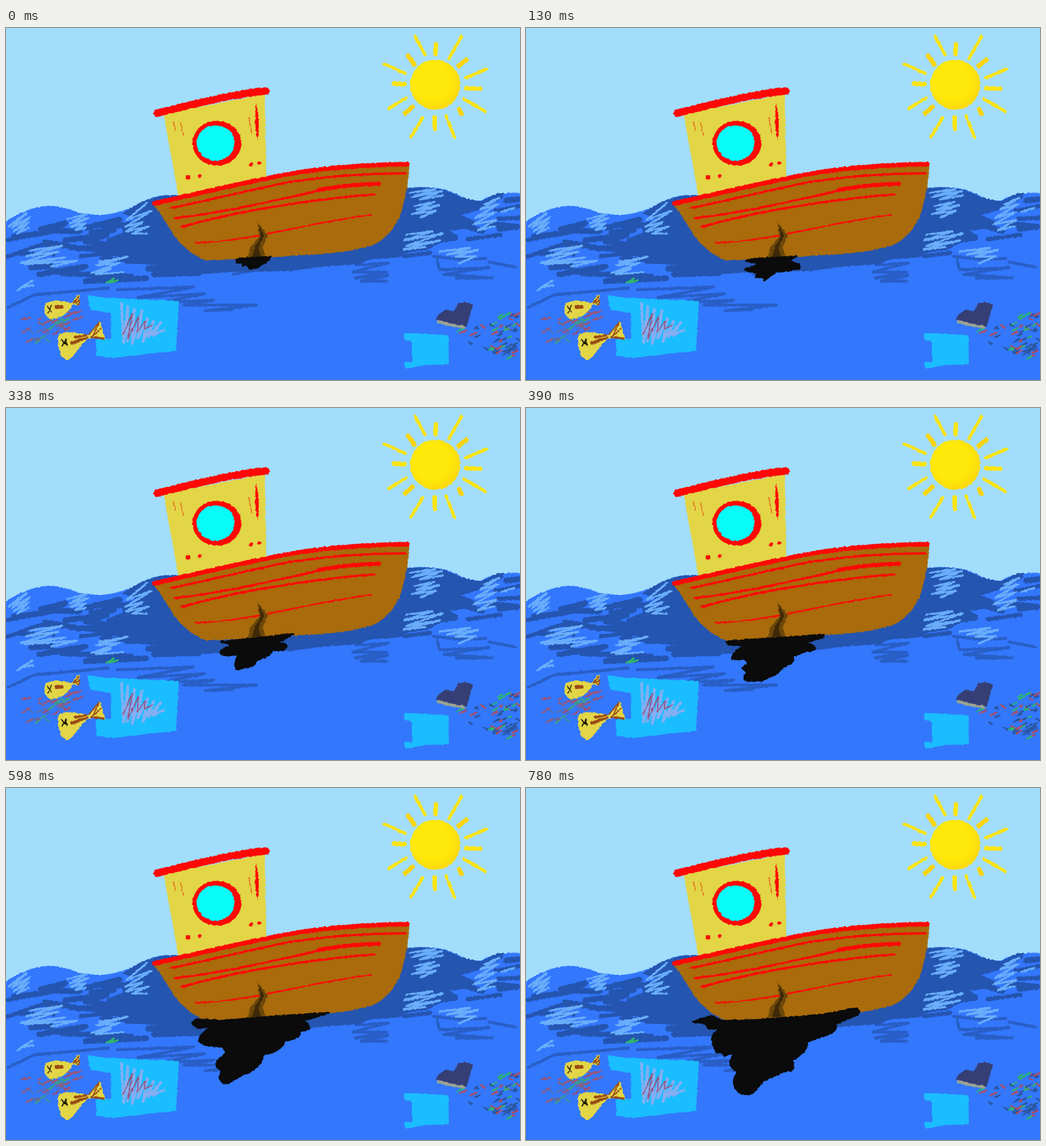
An HTML page for the animation above (0.91 s loop, 904 by 620 pixels).

```html
<!DOCTYPE html>
<html lang="en">
<head>
<meta charset="utf-8">
<title>Leaking boat</title>
<style>
  html, body { margin: 0; width: 100%; height: 100%; overflow: hidden; background: #a2ddfc; }
  svg { display: block; width: 904px; height: 620px; }
  .line { fill: none; stroke-linecap: round; stroke-linejoin: round; }
  .dark { stroke: #2455b0; }
  .light { stroke: #6aaefb; }
  .red { stroke: #fd0806; }
</style>
</head>
<body>
<svg viewBox="0 0 904 620">
  <defs>
    <filter id="crayon" filterUnits="userSpaceOnUse" x="0" y="0" width="904" height="620" color-interpolation-filters="sRGB">
      <feTurbulence type="fractalNoise" baseFrequency=".22" numOctaves="2" seed="4"/>
      <feDisplacementMap in="SourceGraphic" scale="4" xChannelSelector="R" yChannelSelector="G"/>
    </filter>
    <radialGradient id="sunFill" cx=".42" cy=".42" r=".62">
      <stop offset=".6" stop-color="#fee90a"/><stop offset="1" stop-color="#fbd70d"/>
    </radialGradient>
  </defs>

  <g filter="url(#crayon)">
    <g id="rays" class="line"></g>
    <circle cx="755" cy="100" r="44" fill="url(#sunFill)"/>

    <!-- sea -->
    <path fill="#3377fd" d="M-9 346C22 325 50 313 80 313C115 316 125 330 165 329C215 328 245 298 275 295L300 294 500 300 700 283C725 278 750 280 770 284C795 292 815 306 836 304C850 296 865 288 913 291V629H-9Z"/>
    <path fill="#2455b0" d="M204 327Q240 301 275 295L300 294 500 320 704 282Q750 279 774 286Q808 303 836 305L864 291 876 291 874 299 852 312 826 322 800 330 832 342 820 352 780 357 796 366 764 378 744 390 706 396 690 404 640 408 622 416 560 420 500 428 420 430 350 424 300 416 250 410 190 402 150 394 112 392 108 384 180 382 176 372 206 360 202 346 232 338Z"/>
    <g class="line dark" stroke-width="10">
      <path d="M62 354L104 344 72 357 130 358M104 374L178 364 140 376 200 384M142 352L200 337 172 351 222 345M150 360L190 356"/>
      <path d="M58 434L140 420 98 432 220 438 140 446 246 441M44 422L80 420M212 410L330 416 250 424 412 424 260 434 340 432"/>
      <path d="M846 345L900 350 868 354M806 348L838 358M880 304L904 301M744 376L790 370M14 368L74 360"/>
      <g stroke-width="7">
        <path d="M0 404L60 382 128 386 68 376M20 398L84 398M0 374L40 366M132 402L200 394 168 406 236 410"/>
        <path d="M860 322L904 314M866 336L904 334M812 372L870 364M700 402L746 396"/>
      </g>
      <g stroke-width="5" opacity=".72">
        <path d="M4 492L50 470 180 458M196 461L330 456 232 475 350 468 270 484 366 479 312 488 440 488 350 498 398 496"/>
        <path d="M616 418L672 414 610 430 670 430 614 440 672 436 624 446 670 446"/>
        <path d="M752 402Q800 410 844 406M762 425L758 408M764 426L850 422 770 434 856 440 792 441M850 412L896 421M390 428L460 421 400 434"/>
      </g>
    </g>
    <g class="line light" stroke-width="3.6">
      <path d="M4 350L36 326 10 352 42 333 14 358 40 342 20 362 40 352M108 336L142 328 112 344 146 334 114 350 140 344 122 356 140 352"/>
      <path d="M248 308L212 338 256 322 210 350 240 342 212 358 250 350 222 362 248 362M42 392L98 384 36 402 92 394 26 414 104 404 34 416 124 410 80 420"/>
      <path d="M164 412L214 403 158 418 200 414 150 432 184 424 158 434 206 430M20 462L46 445 26 457 48 453"/>
      <path d="M710 290L756 284 714 298 766 287 728 302 768 295M718 314L754 306 722 320 762 312 714 328 756 322 728 334"/>
      <path d="M704 364L750 358 700 374 768 362 704 384 764 374 700 390 738 386M762 394L816 387 776 399 830 391 790 403 826 402 796 415"/>
      <path d="M842 310L868 299 834 320 866 310 826 334 862 324 822 346 862 338 830 356 860 349M872 324L894 317"/>
    </g>

    <!-- boat -->
    <path fill="#e2d546" d="M277 152L455 116 458 266 304 298Z"/>
    <path class="line red" stroke-width="13" d="M266 150C330 134 400 116 457 111"/>
    <ellipse cx="371" cy="203" rx="43" ry="39.5" fill="#fd0806"/>
    <ellipse cx="368.700" cy="202.500" rx="33.500" ry="31" fill="#06fbf9"/>
    <path fill="#fd0806" d="M440 132Q448 170 442 197Q436 170 440 132Z"/>
    <path class="line" stroke="#e8641f" stroke-width="1.600" d="M294 165L298 179M307 166L312 188M427 158L432 185"/>
    <g fill="#fd0806"><circle cx="320" cy="263" r="4"/><circle cx="341" cy="260" r="3.500"/><circle cx="431" cy="240" r="3.500"/><circle cx="445.500" cy="237.500" r="3"/></g>
    <path fill="#a96b0b" d="M258 309C270 325 280 340 293 362C310 385 330 402 352 409C400 409 450 404 560 398C600 394 640 387 655 377C680 362 695 335 700 305C705 285 710 260 709 238C600 240 540 255 458 265L304 296Z"/>
    <g class="line red" stroke-width="4">
      <path stroke-width="8" d="M261 309C330 293 480 258 530 252C600 243 660 240 706 240"/>
      <path d="M290 317C350 305 420 287 500 271C580 259 650 256 702 256M297 335C400 322 450 308 510 296L560 284M310 350C380 330 500 305 648 293"/>
      <path stroke-width="7" d="M550 285Q600 276 656 274"/>
      <path stroke-width="2.600" d="M333 378C420 378 520 345 642 329"/>
    </g>
    <path fill="#6b4709" d="M442 341L461 366 451 385 457 404 425 404 430 386 446 367Z"/>
    <path fill="#3f2806" d="M444 347L454 366 444 386 448 403 433 403 438 385 448 368Z"/>

    <!-- litter -->
    <g id="flecks" class="line" stroke-width="3"></g>
    <path class="line" stroke="#2fb86d" stroke-width="3" d="M177 449L190 441 182 449 197 444"/>
    <path fill="#1abdff" d="M143 470L165 474 200 476 304 481 299 569 250 574 190 581 159 578 158 549 184 547 185 502 148 496ZM700 537L778 541 779 592 738 594 702 600 700 589 715 588 713 551 701 550Z"/>
    <path class="line" stroke="#83aff2" stroke-width="4.500" d="M203 484L207 554 214 490 214 552 226 496 222 556 239 499 232 546 249 512 241 552 260 516 250 544 272 519 258 542 277 532"/>
    <path class="line" stroke="#96517f" stroke-width="2" d="M206 540L222 503 214 548 233 508 231 535 245 516 243 530 258 523"/>
    <path fill="#363f75" d="M757 514Q758 502 774 497L788 499 795 485 808 483 821 487 810 527Z"/>
    <path class="line" stroke="#9ba393" stroke-width="5" d="M760 517L782 523 806 527"/>
    <g fill="#e2d546">
      <path d="M68 490C70 480 90 478 117 484L124 472 130 471 129 489 118 487C108 505 90 513 78 513C70 508 66 500 68 490Z"/>
      <path d="M92 542C95 535 115 533 145 541L165 516 175 548 148 546C125 560 122 580 108 585C95 583 90 560 92 542Z"/>
    </g>
    <g class="line" stroke="#9b4b16" stroke-width="2">
      <path d="M119 484L128 473 128 488 121 483 130 480M146 540L164 518 153 542 167 530 149 545 172 547"/>
      <path stroke-width="6" d="M88 492L99 491M116 555L127 551"/>
      <path stroke-width="4" d="M122 545L142 541M130 549L144 546M154 545L172 547"/>
    </g>
    <path class="line" stroke="#2b210b" stroke-width="1.800" d="M73 490L80 500M80 488L74 502"/>
    <path class="line" stroke="#1b1406" stroke-width="3" d="M98 550L107 558M106 549L99 560"/>
    <path id="oil" fill="#0b0b0b" stroke="#0b0b0b" stroke-width="3" stroke-linejoin="round"/>
  </g>
</svg>
<script>
const STEP = 130;
const oil = document.getElementById('oil');
const spills = [
  'M405 408L412 406 440 404 465 403Q464 410 450 417L440 423 429 424 424 418 416 419 418 414 405 413Z',
  'M398 407L425 405 476 402 461 411 480 416 482 423 452 429 440 429 419 445 416 439 404 439 407 431 390 429 385 425 411 416 387 410Z',
  'M378 412L440 405 505 398 488 408 473 414Q496 413 493 422Q486 430 470 426L462 436 442 444 434 454 406 461Q399 456 408 434Q382 440 377 430Q378 424 398 418Z',
  'M353 411L440 405 524 399 524 403 490 414Q508 416 508 425L485 431 470 438Q474 448 455 455L440 469 415 480 390 481Q378 476 390 466L380 458 391 450 384 442 363 443Q358 434 384 418L356 417Z',
  'M327 414L335 407 380 410 470 402 568 396 550 402 520 411Q534 412 533 424L517 429Q520 440 490 446Q485 464 451 470Q454 484 430 499L405 511Q391 522 384 520Q372 516 379 498Q364 488 373 479L388 467 380 455Q348 456 340 446Q338 436 361 420L336 423Z',
  'M293 412L325 401 345 410 400 409 520 399 582 388 587 394 584 399 546 415Q548 432 520 438L494 447Q498 463 467 480Q473 488 468 497L455 499 436 507 415 517Q402 540 388 540Q366 538 365 515L372 499Q356 492 360 480L366 466 349 472 345 465 335 466 329 452 327 440Q330 430 342 425L322 424 314 414Z'
];

const add = (parent, attrs) => {
  const path = document.createElementNS('http://www.w3.org/2000/svg', 'path');
  for (const key in attrs) path.setAttribute(key, attrs[key]);
  document.getElementById(parent).append(path);
};

// x1, y1, x2, y2 of each sun ray; every second one is short and thick
[
  [719, 14, 737, 47], [756, 29, 755, 46], [801, 15, 779, 54], [809, 56, 796, 67],
  [846, 72, 808, 88], [810, 106, 834, 107], [805, 125, 843, 147], [797, 143, 801, 151],
  [774, 155, 789, 193], [754, 157, 754, 178], [733, 158, 712, 192], [715, 139, 702, 150],
  [704, 123, 673, 142], [701, 99, 682, 98], [702, 80, 665, 63], [718, 64, 707, 49]
].forEach(([x1, y1, x2, y2], i) => add('rays', {
  d: `M${x1} ${y1}L${x2} ${y2}`, 'stroke-width': i % 2 ? 8 : 5.5, stroke: i % 4 === 3 ? '#fad40f' : '#fee511'
}));

let seed = 11;
const random = () => (seed = seed * 16807 % 2147483647) / 2147483647;

function scatter(count, colors, place) {
  for (let i = 0; i < count; i++) {
    const [x, y] = place(random(), random());
    const length = 5 + random() * 6, slope = random() < .75 ? -.5 : .6;
    add('flecks', { d: `M${x} ${y}l${length} ${length * slope}`, stroke: colors[i % colors.length] });
  }
}
scatter(42, ['#95597f', '#3d9b8c', '#a34d6b', '#5670ac'], (a, b) => [28 + a * 76, 512 + a * -6 + b * (55 - a * 22)]);
scatter(7, ['#95597f', '#a34d6b'], (a, b) => [104 + a * 24, 492 + b * 22]);
scatter(66, ['#b14c60', '#2b559f', '#2bb66d', '#2b559f'], (a, b) => {
  const far = Math.sqrt(a);
  return [784 + far * 114, 536 - far * 38 + b * (10 + far * 82)];
});

let shown = -1;
function draw(now) {
  const step = Math.min(Math.floor(now % (7 * STEP) / STEP), spills.length - 1);
  if (step !== shown) oil.setAttribute('d', spills[shown = step]);
  requestAnimationFrame(draw);
}
draw(performance.now());
</script>
</body>
</html>
```
